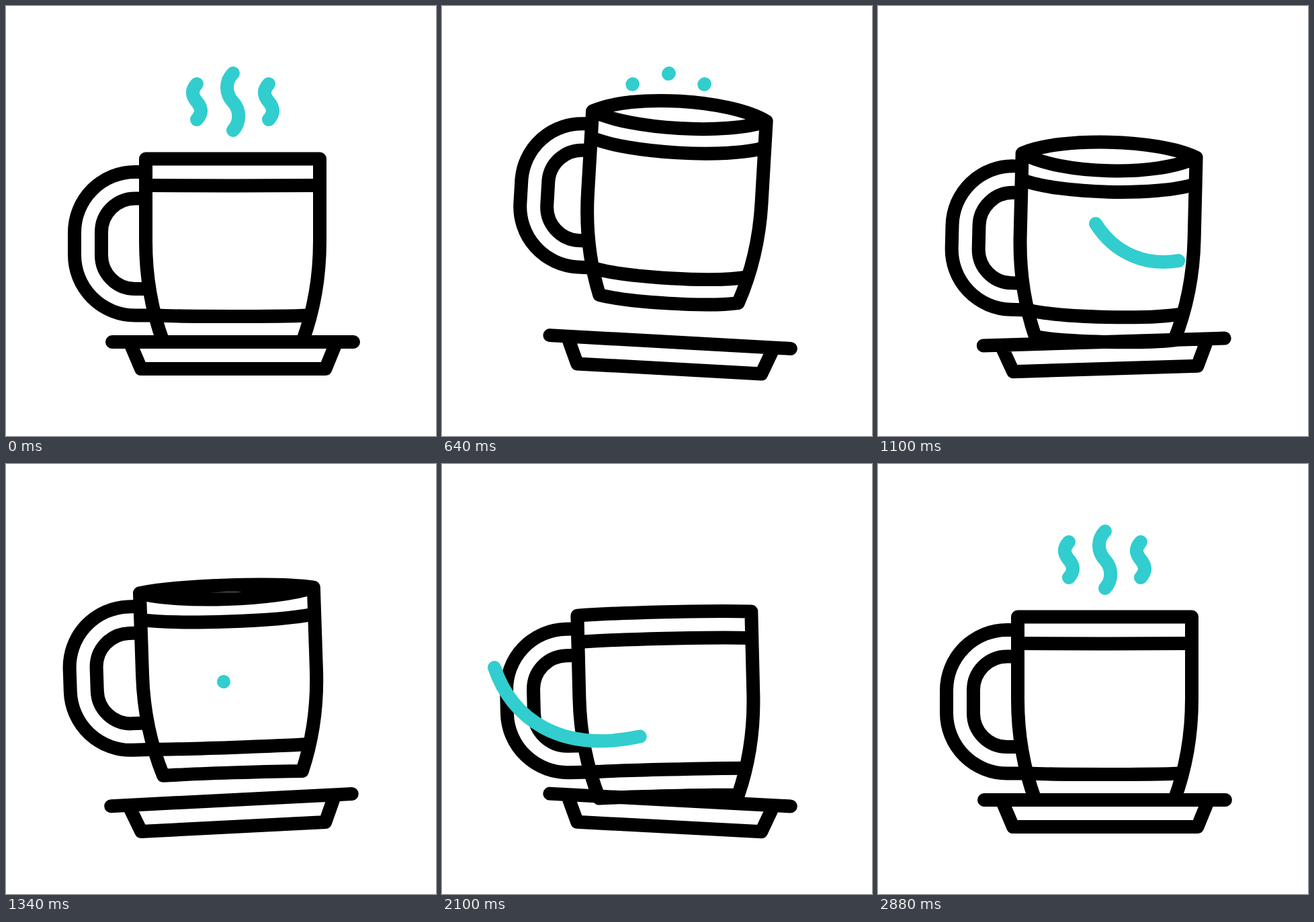
These frames come from a looping animation (640 by 640 pixels, 2900 ms). An HTML page:

```html
<!DOCTYPE html>
<html lang="en">
<head>
<meta charset="utf-8">
<title>Coffee cup</title>
<style>
  html, body { margin: 0; width: 100%; height: 100%; overflow: hidden; background: #fff; }
  svg { display: block; width: 100%; height: 100%; }
  path { fill: none; stroke-width: 20; stroke-linejoin: round; }
  .ink { stroke: #000; }
  .teal { stroke: #32cdce; }
  .round { stroke-linecap: round; }
</style>
</head>
<body>
<svg viewBox="0 0 640 640">
  <g id="cup" class="ink">
    <path id="handle"/>
    <path id="body" class="round"/>
    <path id="bands"/>
  </g>
  <g id="saucer" class="ink round">
    <path d="M158 500H517M187 507L201 540H475.5L489 507"/>
  </g>
  <g class="teal round">
    <path class="steam" pathLength="100" d="M284 116C276 125 276 133 284 142.500C292 152 292 160 284 169"/>
    <path class="steam" pathLength="100" d="M338 100C326 112 326 130 338 143C349 155 349 173 338 185"/>
    <path class="steam" pathLength="100" d="M391 116C383 125 383 133 391 142.500C399 152 399 160 391 169"/>
    <path id="swoopRight" pathLength="100" d="M555 291C520 385 385 420 324 324"/>
    <path id="swoopLeft" pathLength="100" d="M78 303C105 383 185 440 324 398"/>
  </g>
</svg>
<script>
const LOOP = 2900;
const $ = id => document.getElementById(id);
const steams = document.querySelectorAll('.steam');

// Smooth monotone curve through [time, value] keys, flat at every extreme.
function track(...keys) {
  const slope = i => (keys[i + 1][1] - keys[i][1]) / (keys[i + 1][0] - keys[i][0]);
  const tangents = keys.map((_, i) => {
    if (i === 0 || i === keys.length - 1) return 0;
    const a = slope(i - 1), b = slope(i);
    return a * b > 0 ? 2 * a * b / (a + b) : 0;
  });
  return t => {
    if (t <= keys[0][0]) return keys[0][1];
    const i = keys.findIndex(k => k[0] > t) - 1;
    if (i < 0) return keys[keys.length - 1][1];
    const [t0, v0] = keys[i], [t1, v1] = keys[i + 1];
    const h = t1 - t0, u = (t - t0) / h, w = 1 - u;
    return v0 * (1 + 2 * u) * w * w + v1 * u * u * (3 - 2 * u)
      + h * u * w * (tangents[i] * w - tangents[i + 1] * u);
  };
}

// Curvature tracks share the same key times.
const poseTimes = [160, 420, 860, 1340, 1660, 2100, 2420];
const pose = (...values) => track(...values.map((v, i) => [poseTimes[i], v]));

const lift = track([160, 0], [420, -45], [600, -66], [860, -23], [1010, 0],
  [1340, -39.5], [1590, -67], [1660, -64], [2100, -5], [2220, 0]);
const tilt = track([160, 0], [420, 1.05], [800, 4.4], [860, 4.2], [1340, -1.9],
  [1600, -3.9], [1660, -3.8], [2100, -1.4], [2420, 0]);
const sway = track([160, 0], [420, 1.6], [700, 3.3], [860, 2.2], [1260, -3.3],
  [1340, -2.9], [1660, -0.64], [2100, 3], [2180, 3.3], [2320, 2.8], [2860, 0]);

const rimFront = pose(0, 5, 28, 13, -8, -2.5, 0);
const rimBack = pose(0, -8, -32, -7.5, -8, -2.5, 0);
const upperSag = pose(0.5, 8, 19, 7, -7, -2.5, 0.5);
const lowerSag = pose(1.5, 4, 12, 1, -4.5, -1, 1.5);
const baseSag = pose(0, 2, 10, -1, -3.5, -1, 0);
const handleShift = pose(0, 3, 8.5, -2, -8.5, -2, 0);

const steamOut = track([160, 100], [680, 0]);
const steamIn = track([2320, 100], [2840, 0]);
const rightHead = track([640, 0], [900, 100]);
const rightTail = track([880, 0], [1320, 100]);
const leftHead = track([1740, 0], [2190, 100]);
const leftTail = track([2110, 0], [2340, 100]);

// Curve bulging by sag from (x0, y) to (x1, y).
function bow(x0, x1, y, sag) {
  const inset = (x1 - x0) * 0.22, cy = y + sag * 4 / 3;
  return `C${x0 + inset} ${cy} ${x1 - inset} ${cy} ${x1} ${y}`;
}

function loopHandle(r, top, bottom, endX, dx) {
  const x = 192 + dx;
  return `M208 ${top}H${x}a${r} ${r} 0 0 0 ${-r} ${r}V${bottom - r}a${r} ${r} 0 0 0 ${r} ${r}H${endX}`;
}

function trim(path, from, to, visible) {
  path.style.display = visible ? '' : 'none';
  path.setAttribute('stroke-dasharray', `${Math.max(to - from, 0.01)} 300`);
  path.setAttribute('stroke-dashoffset', -Math.min(from, 99.98));
}

function draw(t) {
  $('cup').setAttribute('transform',
    `translate(0 ${lift(t)}) rotate(${tilt(t)} 337.5 500)`);
  $('saucer').setAttribute('transform', `rotate(${sway(t)} 338 540)`);

  const dx = handleShift(t);
  $('handle').setAttribute('d',
    loopHandle(90, 247, 460.5, 222, dx) + loopHandle(50, 286.5, 421, 212, dx));
  $('body').setAttribute('d',
    'M208 227.500V350C208 410 220 462 234 500' + bow(234, 441, 500, baseSag(t)) +
    'C455 462 467 410 467 350V227.500' + bow(467, 208, 227.5, rimBack(t)) +
    bow(208, 467, 227.5, rimFront(t)));
  $('bands').setAttribute('d',
    'M208 267' + bow(208, 467, 267, upperSag(t)) +
    'M222 460.500' + bow(222, 453, 460.5, lowerSag(t)));

  for (const s of steams) {
    if (t < 690) trim(s, 0, steamOut(t), true);
    else trim(s, steamIn(t), 100, t >= 2320);
  }
  trim($('swoopRight'), rightTail(t), rightHead(t), t >= 660 && t < 1360);
  trim($('swoopLeft'), leftTail(t), leftHead(t), t >= 1750 && t < 2340);
}

const start = performance.now();
function tick() {
  draw((performance.now() - start) % LOOP);
  requestAnimationFrame(tick);
}
tick();
</script>
</body>
</html>
```
